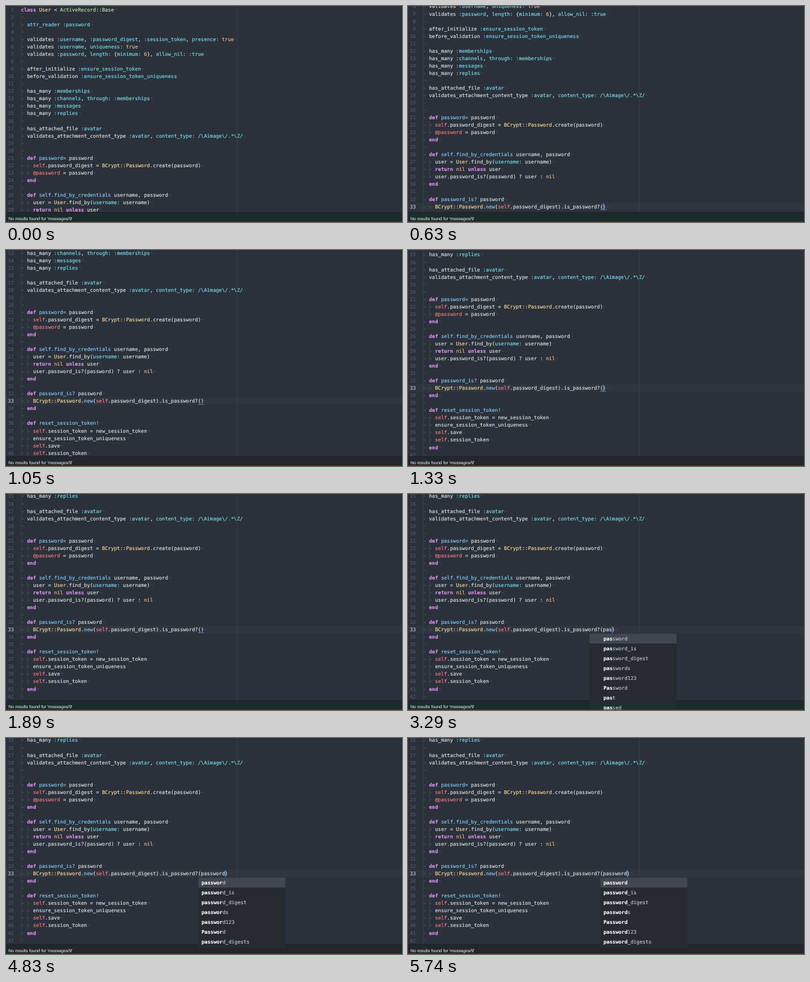
An HTML page that plays this animation: 640x351 px, repeating every 5.81 s.

```html
<!DOCTYPE html>
<html lang="en">
<head>
<meta charset="utf-8">
<title>Editor</title>
<style>
  html, body { margin: 0; width: 100%; height: 100%; overflow: hidden; background: #2b313a; }
  svg { display: block; width: 100%; height: 100%; }
  text {
    font: 8.06px "DejaVu Sans Mono", "Liberation Mono", monospace;
    color: #e2e6ec; white-space: pre; text-rendering: geometricPrecision;
  }
  text, tspan { fill: currentColor; stroke: currentColor; stroke-width: 0.12px; }
  .num { color: #525a68; text-anchor: end; }
  .now { color: #c4cad4; }
  .dim { color: #4a515d; stroke: none; }
  .key { color: #dc94f0; font-weight: bold; }
  .fn { color: #86d0ff; }
  .type { color: #ffdf9c; }
  .base { color: #c0e6a8; }
  .sym { color: #78e2f0; }
  .lit { color: #f2bd85; }
  .self { color: #fc7d86; }
  .hit { color: #ffffff; font-weight: bold; }
  .item { color: #c3c9d2; }
  .status { font: 7px "Liberation Sans", Arial, sans-serif; color: #d3d8e0; }
</style>
</head>
<body>
<svg viewBox="0 0 640 351" preserveAspectRatio="none">
  <rect width="640" height="351" fill="#2b313a"/>
  <g id="code">
    <rect id="row" width="640" height="12" fill="#30363f"/>
  </g>
  <rect x="373.4" width="1" height="335" fill="#3a4049"/>
  <rect y="335" width="640" height="16" fill="#22272e"/>
  <rect y="335" width="640" height="1" fill="#1c2026"/>
  <text class="status" x="4" y="348.2">No results found for 'messages/9'</text>
  <g id="popup"></g>
  <rect y="350" width="640" height="1" fill="#0a5a12"/>
</svg>
<script>
const LOOP = 5810, STEP = 70;
const LEFT = 24.3, CHAR = 4.852, LINE = 12.04, TOP = 6;
const ACTIVE = 33, WORD = 'password';

const source = String.raw`class User < ActiveRecord::Base

  attr_reader :password

  validates :username, :password_digest, :session_token, presence: true
  validates :username, uniqueness: true
  validates :password, length: {minimum: 6}, allow_nil: :true

  after_initialize :ensure_session_token
  before_validation :ensure_session_token_uniqueness

  has_many :memberships
  has_many :channels, through: :memberships
  has_many :messages
  has_many :replies

  has_attached_file :avatar
  validates_attachment_content_type :avatar, content_type: /\Aimage\/.*\Z/


  def password= password
    self.password_digest = BCrypt::Password.create(password)
    @password = password
  end

  def self.find_by_credentials username, password
    user = User.find_by(username: username)
    return nil unless user
    user.password_is?(password) ? user : nil
  end

  def password_is? password
    BCrypt::Password.new(self.password_digest).is_password?()
  end

  def reset_session_token!
    self.session_token = new_session_token
    ensure_session_token_uniqueness
    self.save
    self.session_token
  end
`.split('\n');

const rules = [
  ['base', /(?<=< )\S+/],
  ['fn', /(?<=def )\S+|\battr_reader\b|\bnew(?=\()/],
  ['key', /\b(?:class|def|end|return|unless)\b/],
  ['sym', /\/\\A.*\/|\w+:(?=\s)|(?<!:):\w+/],
  ['type', /[A-Z]\w*(?:::[A-Z]\w*)*/],
  ['lit', /\b(?:true|nil|\d+)\b/],
  ['self', /\bself\b|@\w+/]
];
const lexer = new RegExp(rules.map(([name, re]) => `(?<${name}>${re.source})`).join('|'), 'g');

const $ = id => document.getElementById(id);
const code = $('code'), popup = $('popup');

function add(parent, tag, attrs, body = '') {
  const el = document.createElementNS('http://www.w3.org/2000/svg', tag);
  for (const k in attrs) el.setAttribute(k, attrs[k]);
  el.textContent = body;
  parent.appendChild(el);
  return el;
}

const span = (el, cls, body) => add(el, 'tspan', { class: cls }, body);
const lineY = n => TOP + (n - 1) * LINE;
const indentOf = line => line.match(/^ */)[0];

function fillLine(el, line) {
  el.textContent = '';
  const indent = indentOf(line);
  span(el, 'dim', indent.replace(/ {2}/g, '» '));
  const body = line.slice(indent.length);
  let at = 0;
  for (const m of body.matchAll(lexer)) {
    span(el, '', body.slice(at, m.index));
    span(el, Object.keys(m.groups).find(k => m.groups[k]), m[0]);
    at = m.index + m[0].length;
  }
  span(el, '', body.slice(at));
  span(el, 'dim', '¬');
}

$('row').setAttribute('y', lineY(ACTIVE) - 6);
const lines = source.map((line, i) => {
  const n = i + 1, y = lineY(n) + 2.9;
  const guides = i ? Math.max(1, indentOf(line).length / 2) : 0;
  for (let g = 0; g < guides; g++) {
    add(code, 'rect', { x: LEFT + g * 2 * CHAR, y: lineY(n) - 6, width: 0.8, height: LINE, fill: '#3c434e' });
  }
  add(code, 'text', { class: n === ACTIVE ? 'num now' : 'num', x: 12.6, y }, n);
  const el = add(code, 'text', { x: LEFT, y });
  fillLine(el, line);
  return el;
});

const openX = LEFT + 59 * CHAR, wordX = openX + CHAR;
const marks = [0, 1].map(i => add(code, 'rect', {
  x: openX + i * CHAR, y: lineY(ACTIVE) + 5, width: CHAR, height: 0.8, fill: '#6a9fe8'
}));
const caret = add(code, 'rect', { y: lineY(ACTIVE) - 5.5, width: 1, height: 11.5, fill: '#5a96ff' });

// Times at which each letter of the word is typed
const keys = [3080, 3150, 3220, 3640, 3990, 4200, 4480, 4830];
const typedAt = t => keys.filter(k => k <= t).length;

const path = [[0, 0], [70, 0], [280, 12], [560, 52], [840, 106.4],
  [1050, 145.8], [1260, 165], [1470, 171], [LOOP, 171]];

function scrollAt(t) {
  const i = path.findIndex(p => p[0] > t);
  const [t0, a] = path[i - 1], [t1, b] = path[i];
  return a + (b - a) * (t - t0) / (t1 - t0);
}

function matches(n) {
  const tail = n < 4 ? ['past', 'passed'] : n < 5 ? ['passed', 'password_digests'] : ['password_digests'];
  const mid = ['password123', 'Password'];
  if (n === WORD.length) mid.reverse();
  return ['password', 'password_is', 'password_digest', 'passwords', ...mid, ...tail];
}

function drawPopup(n) {
  popup.textContent = '';
  if (n < 3) return;
  const x = n < 4 ? 293.5 : 311, y = 227, items = matches(n);
  add(popup, 'rect', { x, y, width: 140.5, height: Math.min(items.length * 16 + 2, 123), fill: '#262b31' });
  add(popup, 'rect', { x, y, width: 140.5, height: 16, fill: '#414751' });
  items.forEach((item, i) => {
    const el = add(popup, 'text', { class: 'item', x: wordX + 0.6, y: 237.6 + i * 16 });
    span(el, 'hit', item.slice(0, n));
    span(el, '', item.slice(n));
  });
}

let shownWord = -1, shownList = -1;

function render(time) {
  const t = Math.floor(time % LOOP / STEP) * STEP;
  const typed = typedAt(t);
  // Suggestions trail the typing by one step once the list is open
  const list = typed < 3 ? 0 : Math.max(3, typedAt(t - STEP));
  code.setAttribute('transform', `translate(0 ${-scrollAt(t)})`);

  if (typed !== shownWord) {
    shownWord = typed;
    fillLine(lines[ACTIVE - 1], source[ACTIVE - 1].replace('()', `(${WORD.slice(0, typed)})`));
    const end = wordX + typed * CHAR;
    caret.setAttribute('x', end - 0.3);
    marks[1].setAttribute('x', end);
  }
  const since = t - (typed ? keys[typed - 1] : 300);
  caret.setAttribute('opacity', (since + 800) % 800 < 400 ? 1 : 0);
  for (const m of marks) m.setAttribute('opacity', list ? 0 : 1);

  if (list !== shownList) drawPopup(shownList = list);
}

const start = performance.now();
function tick() {
  render(performance.now() - start);
  requestAnimationFrame(tick);
}
tick();
</script>
</body>
</html>
```
